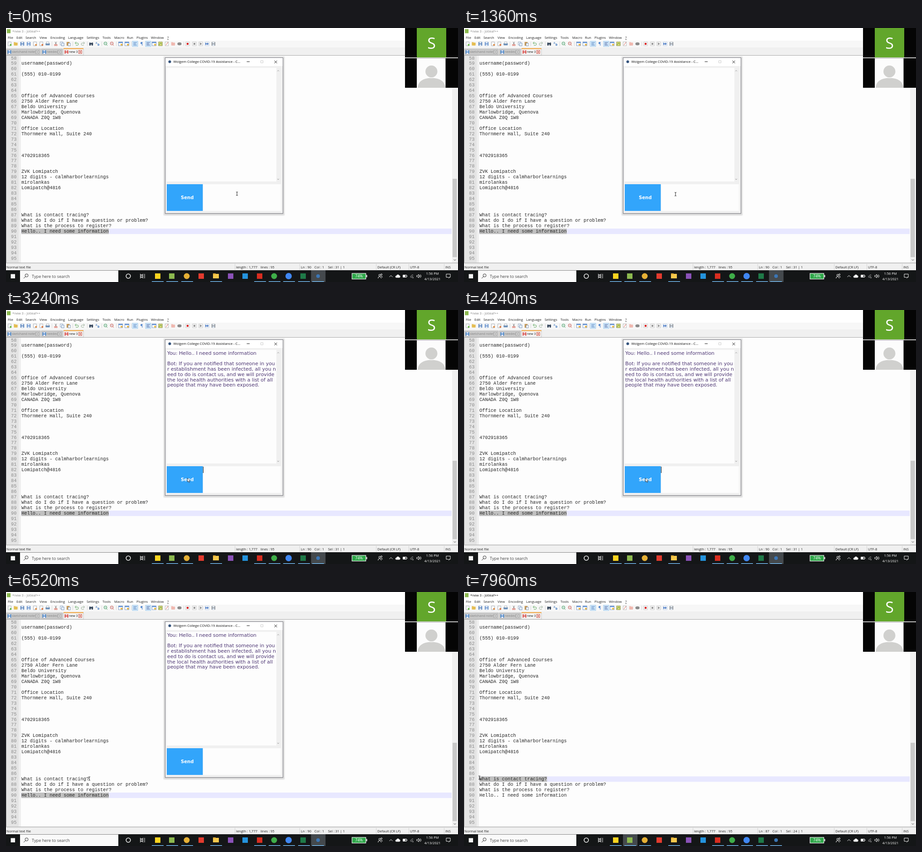
Recreate the animation shown at these times as an HTML page. Size 998 px wide and 561 px high, loop 8000 ms.

```html
<!DOCTYPE html>
<html lang="en">
<head>
<meta charset="utf-8">
<title>Chat assistant demo</title>
<style>
  html, body { margin: 0; width: 100%; height: 100%; overflow: hidden; background: #fff; }
  svg { display: block; width: 100vw; height: 100vh; }
  text { white-space: pre; }
  .ui { font: 7.5px "Open Sans", "Noto Sans", sans-serif; fill: #222; }
  .mono { font: 10.37px "Liberation Mono", monospace; fill: #262626; }
  .num { fill: #8c8c8c; }
  .chat { font: 10.9px "DejaVu Sans", sans-serif; fill: #4d3674; }
  .entry { font: 12.9px "Liberation Sans", sans-serif; fill: #111; }
  .send { font: bold 10.1px "DejaVu Sans", sans-serif; fill: #fff; }
  .line { fill: none; stroke-width: 1; }
</style>
</head>
<body>
<svg id="stage" viewBox="0 0 998 561" preserveAspectRatio="none"></svg>
<script>
const LOOP = 8000;
const CHAR = 6.222, LEFT = 34, FIRST_ROW = 58, PITCH = 11.946;
const FOCUS = 1370, PASTE = 1600, REPLY = 2800, SWITCH = 6760;
const QUESTION = 24;

const box = (x, y, w, h, fill, more = '') =>
  `<rect x="${x}" y="${y}" width="${w}" height="${h}" fill="${fill}" ${more}/>`;
const disc = (x, y, r, fill, more = '') =>
  `<circle cx="${x}" cy="${y}" r="${r}" fill="${fill}" ${more}/>`;
const line = (d, color, more = '') => `<path class="line" d="${d}" stroke="${color}" ${more}/>`;
const label = (x, y, text, cls = 'ui', more = '') =>
  `<text x="${x}" y="${y}" class="${cls}" ${more}>${text}</text>`;
const group = (id, body) => `<g id="${id}">${body}</g>`;
const rowMid = n => 66.4 + (n - FIRST_ROW) * PITCH;

const notes = {
  59: 'username(password)',
  61: '(555) 010-0199',
  65: 'Office of Advanced Courses',
  66: '2750 Alder Fern Lane',
  67: 'Beldo University',
  68: 'Marlowbridge, Quenova',
  69: 'CANADA Z0Q 1W8',
  71: 'Office Location',
  72: 'Thornmere Hall, Suite 240',
  76: '4702918365',
  79: 'ZVK Lomipatch',
  80: '12 digits - calmharborlearnings',
  81: 'mirolankas',
  82: 'Lomipatch@4816',
  87: 'What is contact tracing?',
  88: 'What do I do if I have a question or problem?',
  89: 'What is the process to register?',
  90: 'Hello.. I need some information'
};

const reply = [
  'You: Hello.. I need some information',
  '',
  'Bot: If you are notified that someone in you',
  'r establishment has been infected, all you n',
  'eed to do is contact us, and we will provide',
  'the local health authorities with a list of all',
  'people that may have been exposed.'
];

// Toolbar glyphs, drawn around the centre of a 10 px cell
const glyph = {
  page: c => box(-3.5, -4.5, 7, 9, '#fff', 'stroke="#8a929c" stroke-width=".8"') + disc(2.5, 2.5, 2.2, c),
  disk: c => box(-4.5, -4.5, 9, 9, c, 'rx="1"') + box(-2.5, -4, 5, 3, '#e8f0fa') + box(-2.5, 1, 5, 3.5, '#dbe6f4'),
  folder: c => box(-4.5, -3, 9, 7, c, 'rx="1"') + box(-4.5, -4, 4, 2, c),
  printer: c => box(-5, -1.5, 10, 5, c, 'rx="1"') + box(-3, -4.5, 6, 4, '#fff', 'stroke="#8996a5" stroke-width=".7"'),
  cut: c => line('M-2-5L2 2M2-5L-2 2', '#777') + disc(-2, 3, 1.6, 'none', `stroke="${c}"`) + disc(2, 3, 1.6, 'none', `stroke="${c}"`),
  copy: c => box(-4.5, -4.5, 6, 7, '#fff', `stroke="${c}" stroke-width=".8"`) + box(-1.5, -2, 6, 7, '#e6effa', `stroke="${c}" stroke-width=".8"`),
  paste: c => box(-4.5, -4.5, 7, 9, c) + box(-1, -1.5, 5.5, 6.5, '#f4f7fb', 'stroke="#6d85a5" stroke-width=".8"'),
  undo: c => line('M-3-2H1.500A2.700 2.700 0 0 1 1.500 3.500H-2M-1-5L-4-2L-1 1', c, 'stroke-width="1.6"'),
  redo: c => line('M3-2H-1.500A2.700 2.700 0 0 0-1.500 3.500H2M1-5L4-2L1 1', c, 'stroke-width="1.6"'),
  find: c => box(-4.5, -3, 3.6, 7, c, 'rx="1"') + box(.9, -3, 3.6, 7, c, 'rx="1"') + box(-1.5, -2, 3, 3, c),
  swap: c => label(-5, 0, 'a', 'ui', `style="fill:${c}"`) + label(0, 4.5, 'b', 'ui', `style="fill:${c};font-weight:bold"`),
  zoom: c => disc(-.5, -1, 3.4, '#eef6ff', `stroke="${c}" stroke-width="1.2"`) + line('M2 2L4.500 4.500M-2-1H1', c, 'stroke-width="1.3"'),
  panes: c => box(-5, -4.5, 10, 9, '#fff', 'stroke="#5b7fb5" stroke-width=".8"') + box(-5, -4.5, 10, 2.5, '#5f8fd0') + box(0, 0, 4.5, 4, c),
  lines: c => box(-6.5, -6.5, 13, 13, '#cfe5f8', 'stroke="#86bde8" stroke-width=".7"') + line('M-4-3H4M-4 0H2M-4 3H4', c, 'stroke-width="1.4"'),
  mark: c => label(-2.5, 3.5, '¶', 'ui', `style="fill:${c};font-size:10px"`),
  map: c => box(-4.5, -4.5, 9, 9, c, 'stroke="#77803d" stroke-width=".8"') + line('M-4 3L0-2L4 1', '#4c8a45'),
  func: c => box(-4, -4.5, 8, 9, '#fff', 'stroke="#999" stroke-width=".7"') + line('M-2 3L3-4', c, 'stroke-width="1.5"'),
  eye: c => `<ellipse rx="5" ry="3.6" fill="${c}"/>`,
  rec: c => box(-4.5, -4.5, 9, 9, '#f5f5f5', 'stroke="#b5b5b5" stroke-width=".7"') + disc(0, 0, 2.5, c),
  stop: c => box(-4.5, -4.5, 9, 9, '#f5f5f5', 'stroke="#b5b5b5" stroke-width=".7"') + box(-2, -2, 4, 4, c),
  play: c => box(-4.5, -4.5, 9, 9, '#f5f5f5', 'stroke="#b5b5b5" stroke-width=".7"') + `<path d="M-2-3L3 0L-2 3Z" fill="${c}"/>`,
  skip: c => box(-4.5, -4.5, 9, 9, '#f5f5f5', 'stroke="#a5bfe0" stroke-width=".7"') + `<path d="M-4-3L0 0L-4 3ZM0-3L4 0L0 3Z" fill="${c}"/>`
};

const tools = `page 8 #65b945|folder 21.5 #e5bd51|disk 36 #5a83bb|disk 50 #6a93cc|page 64 #e08b42|page 78 #dd7740|printer 92 #6d91ba
|cut 110 #d8503f|copy 124 #6787b0|paste 138 #c89a55|undo 156 #4ca04c|redo 170 #8ba58b|find 188 #36475c|swap 202 #3974bd
|zoom 220 #55a368|zoom 234 #cf6357|panes 253 #eab84b|panes 267 #eab84b|lines 285 #3b70b5|mark 299 #3b77c9|lines 314 #364f91
|panes 327 #efc24c|map 341 #d6d873|func 355 #d64c40|folder 369 #efb8b0|eye 383 #8b8b8b|rec 401 #dc1d1d|stop 416 #8d8d8d
|play 430 #8d8d8d|skip 444 #3e72c4|disk 458 #93989e`.split('|').map(s => s.trim().split(' '));

const menus = [['File', 4], ['Edit', 23], ['Search', 43], ['View', 74], ['Encoding', 98], ['Language', 137],
  ['Settings', 178], ['Tools', 213], ['Macro', 239], ['Run', 267], ['Plugins', 288], ['Window', 320]];

function tab(x, w, text, active) {
  const tint = active ? '#d94a43' : '#4a86c5';
  return box(x, 46, w, 14, active ? '#f6f6f6' : '#c9c9c9', 'stroke="#aaa" stroke-width=".6"') +
    (active ? box(x, 44.5, w, 2, '#f5a53c') : '') +
    box(x + 2.5, 49, 8, 8, tint, 'rx="1"') + box(x + 4.5, 49.5, 4, 2.5, '#eef') + box(x + 4.5, 54, 4, 3, '#eef') +
    label(x + 12, 55.2, text, 'ui', `style="font-size:7.1px;fill:${active ? '#222' : '#858585'}"`) +
    box(x + w - 10.5, 49.5, 7, 7, active ? '#fbe9e7' : '#ddd', `stroke="${active ? '#c0392b' : '#999'}" stroke-width=".8"`) +
    line(`M${x + w - 9} 51l4 4m0-4l-4 4`, active ? '#c0392b' : '#999');
}

function editor() {
  let s = box(0, 0, 998, 535, '#f0f0f0') + box(0, 0, 998, 28, '#fff') + box(0, 28, 998, 15, '#f7f7f7') +
    box(2, 2.5, 8, 9, '#8cb94f') +
    label(14, 10.3, '*new 3 - Jotleaf++', 'ui', 'id="caption"');
  s += menus.map(([t, x]) => label(x, 24.3, t)).join('') + label(356, 24.3, '?', 'ui', 'text-decoration="underline"');
  s += tools.map(([k, x, c]) => `<g transform="translate(${x} 35) scale(.92)">${glyph[k](c)}</g>`).join('');
  s += [101, 147, 179, 211, 243.5, 276, 392].map(x => box(x, 30, .7, 10, '#ccc')).join('');
  s += tab(1, 75, 'sketchand notes') + tab(78, 47, 'needed') + tab(127, 44, 'new 3', true);
  s += box(0, 60, 998, 1, '#a8a8a8') + box(1, 61, 984, 457, '#fdfdfd') + box(1, 61, 27, 457, '#e4e4e4') +
    box(28, 61, 5, 457, '#efefef') + box(0, 60, 1, 459, '#999');
  s += box(33.5, 0, 950.5, 12, '#e8e8ff', 'id="row"') + box(0, 0, 0, 12, '#c0c0c0', 'id="picked"');
  for (let n = FIRST_ROW; n <= 95; n++) {
    const y = rowMid(n) + 3.1;
    s += label(11, y, n, 'mono num') + (notes[n] ? label(LEFT, y, notes[n], 'mono') : '');
  }
  s += box(985, 61, 13, 457, '#f0f0f0') + box(986, 333, 9.5, 173, '#c9c9c9') + line('M988.500 511l2.500 2.500l2.500-2.500', '#555');
  return s;
}

function statusBar() {
  return box(0, 518, 998, 17, '#f0f0f0') + box(0, 518.5, 998, 1, '#999') +
    [505, 648, 817, 889, 967].map(x => box(x, 521, .8, 13, '#cfcfcf')).join('') +
    label(1, 530.5, 'Normal text file') + label(508, 530.5, 'length : 1,777') + label(562, 530.5, 'lines : 95') +
    label(651, 530.5, '', 'ui', 'id="ln"') + label(681, 530.5, '', 'ui', 'id="col"') + label(711, 530.5, '', 'ui', 'id="sel"') +
    label(820, 530.5, 'Default (CR LF)') + label(892, 530.5, 'UTF-8') + label(970, 530.5, 'INS');
}

function callers() {
  return box(881, 0, 117, 132, '#050505') + box(907, 0, 65, 65, '#62a62b') + box(881, 65, 117, 1.6, '#f2f2f2') +
    label(939.5, 46, 'S', 'ui', 'text-anchor="middle" style="font-size:34px;fill:#fff"') +
    box(907, 67, 63.5, 65, '#fcfcfc') +
    '<path d="M909 132C910 117 922 110.500 939.500 110.500S969 117 970 132Z" fill="#d0d0ce"/>' +
    disc(939.3, 96, 13.8, '#d0d0ce', 'stroke="#fcfcfc" stroke-width="1.2"');
}

function taskbar() {
  const white = '#f4f4f4';
  const square = (x, c) => box(x - 6, 542, 12, 12, c);
  const round = (x, c, r = 6.5) => disc(x, 548, r, c);
  return box(0, 535, 998, 26, '#141617') +
    box(0, 535, 0, 26, '#44494d', 'id="tile"') +
    box(10.5, 543.5, 9.5, 9.5, white) + box(31, 535.5, 217, 25.5, '#fafafa') +
    disc(45.5, 546.5, 3.4, 'none', 'stroke="#333"') + line('M43 549l-4 4', '#333') +
    label(57, 551.6, 'Type here to search', 'ui', 'style="font-size:9.2px;fill:#444"') +
    disc(270, 548, 4.8, 'none', `stroke="${white}" stroke-width="1.6"`) +
    line('M296.500 543v2h6v-2M296.500 553v-2h6v2M296.500 546.500h6v3h-6zM306 543v10', white) +
    square(335, '#fbd41f') + square(366, '#8cb94f') + round(399, '#e5b035') + square(431, '#e33b2e') +
    box(457, 543, 13, 10, '#f5c84c') + box(457, 542, 6, 3, '#e5b03a') +
    square(496, '#8a52b8') + square(528, '#2493dd') + square(560, '#d92d20') + round(592, '#3fae49') +
    round(624, '#4087f2', 7) + square(656, '#1f7a48') + round(689, '#3b76b5', 4) +
    [335, 367, 400, 464, 561, 593, 625, 658, 689].map(x => box(x - 13, 559.4, 26, 1.6, '#6fb2e6')).join('') +
    box(764, 542, 30.5, 12.5, '#2fa84a', 'stroke="#eee" stroke-width="1.2"') + box(795.4, 545.5, 2, 5, '#eee') +
    label(779.5, 551.3, '74%', 'ui', 'text-anchor="middle" style="font-size:8.6px;fill:#fff"') +
    disc(825, 546, 2, 'none', `stroke="${white}"`) + disc(829, 544.5, 1.6, 'none', `stroke="${white}"`) +
    line('M821.500 553q0-4 3.500-4t3.500 4M828 548q3 0 3 3', white) + line('M846.500 550l3.500-3.500l3.500 3.500', white) +
    '<path d="M862 551.500a2.300 2.300 0 0 1 0-4.600a3.500 3.500 0 0 1 6.500-.5a2.600 2.600 0 0 1 0 5.100Z" fill="#f4f4f4"/>' +
    line('M876.500 545.500h8v5h-8zM885.500 547v2', white) + box(877, 546, 5, 4, white) +
    line('M893 551a6 6 0 0 1 6-6M895 552a4 4 0 0 1 4-4', '#aaa') + disc(898.5, 551.5, 1, white) +
    line('M907 546.500h2l2.500-2.500v8l-2.500-2.500h-2zM913 546q1.500 2 0 4M915 544.500q3 3.500 0 7', white) +
    label(941.5, 544.8, '1:56 PM', 'ui', 'text-anchor="middle" style="fill:#fff"') +
    label(941.5, 556.8, '4/13/2021', 'ui', 'text-anchor="middle" style="fill:#fff"') +
    line('M972 543.500h9v7h-3v2l-2-2h-4z', white);
}

function chatWindow() {
  const shadow = [5, 3.5, 2].map(d => box(352 - d, 67 - d, 259 + 2 * d, 343 + 2 * d, '#000', 'opacity=".06" rx="3"')).join('');
  return shadow + box(351.5, 65.5, 260, 344, '#f0f0f0', 'stroke="#7c7c84"') + box(352, 66, 259, 18, '#fff') +
    disc(361.5, 74.5, 3, '#33527c') +
    label(369.5, 77.3, 'Wolgem College COVID-19 Assistance - C...', 'ui', 'style="font-size:7.55px;fill:#111"') +
    line('M531.500 74.500h6.500', '#222') + line('M562.500 72h5v5h-5z', '#ccc', 'stroke-width=".8"') + line('M592.500 72l6 6m0-6l-6 6', '#222') +
    box(355, 88, 242, 251, '#fdfdfd') + box(597, 88, 9.5, 251, '#f0f0f0') +
    line('M599 95.500l2-2l2 2M599 333l2 2l2-2', '#999') +
    box(435, 345, 172, 59, '#fdfdfd') + box(355, 345, 79.5, 59, '#32a5fb') +
    label(386, 378, 'Send', 'send') +
    group('reply', reply.map((t, i) => label(356, 99 + i * 11.7, t, 'chat')).join('')) +
    group('draft', label(435, 358, 'Hello.. I need some informatio', 'entry') + label(435, 373, 'n', 'entry')) +
    box(0, 0, 1, 14, '#111', 'id="caret"');
}

const pointers =
  group('beam', line('M-2-4Q0-4 0-3Q0-4 2-4M0-3V3M-2 4Q0 4 0 3Q0 4 2 4', '#222', 'stroke-width=".9"')) +
  group('arrow', '<path d="M0 0V8.700L2.100 6.900L3.500 10L5 9.400L3.600 6.300H6.300Z" fill="#fff" stroke="#111" stroke-width=".7"/>');

document.getElementById('stage').innerHTML =
  editor() + statusBar() + group('chat', chatWindow()) + callers() + taskbar() + pointers;

const el = id => document.getElementById(id);
const set = (id, attrs) => { for (const k in attrs) el(id).setAttribute(k, attrs[k]); };
const show = (id, on) => set(id, { visibility: on ? 'inherit' : 'hidden' });

// Pointer stops: time, x, y
const path = [[0, 510, 366], [600, 467, 367], [1750, 467, 367], [2150, 400.5, 371], [4650, 400.5, 371],
  [5500, 243, 435], [5900, 243, 435], [6500, 184, 412], [6780, 184, 412], [7040, 88, 412], [7300, 34, 410],
  [LOOP, 34, 410]];

function pointerAt(time) {
  const t = Math.min(Math.max(time, 0), LOOP - 1);
  const i = path.findIndex(p => p[0] > t);
  const [a, b] = [path[i - 1], path[i]];
  let k = (t - a[0]) / (b[0] - a[0]);
  if (t < SWITCH) k = k * k * (3 - 2 * k);
  return [a[1] + (b[1] - a[1]) * k, a[2] + (b[2] - a[2]) * k];
}

function draw(t) {
  const editing = t >= SWITCH;
  const [x, y] = pointerAt(t);
  const onWindow = !editing && x > 351 && x < 435 && y < 410;
  show('arrow', onWindow);
  show('beam', !onWindow);
  set(onWindow ? 'arrow' : 'beam', { transform: `translate(${x} ${y})` });

  const typed = t >= PASTE && t < REPLY;
  show('chat', !editing);
  show('draft', typed);
  show('reply', t >= REPLY);
  show('caret', t >= FOCUS && (t - FOCUS) % 900 < 600);
  set('caret', { x: typed ? 441.5 : 435, y: typed ? 361.5 : 346 });

  // The selection trails the pointer slightly while dragging
  const lagged = Math.round((pointerAt(t - 40)[0] - LEFT) / CHAR);
  const start = editing ? Math.min(QUESTION, lagged) : 0;
  const count = editing ? QUESTION - start : notes[90].length;
  const row = editing ? 87 : 90, top = rowMid(row) - 5.6;
  set('row', { y: top });
  set('picked', { x: LEFT + start * CHAR, y: top, width: count * CHAR });
  el('ln').textContent = `Ln : ${row}`;
  el('col').textContent = `Col : ${start + 1}`;
  el('sel').textContent = `Sel : ${count} | ${count ? 1 : 0}`;
  set('tile', editing ? { x: 351, width: 32 } : { x: 673.5, width: 32 });
  el('caption').style.fill = editing ? '#111' : '#888';
}

const begin = performance.now();
function tick() {
  draw((performance.now() - begin) % LOOP);
  requestAnimationFrame(tick);
}
tick();
</script>
</body>
</html>
```
